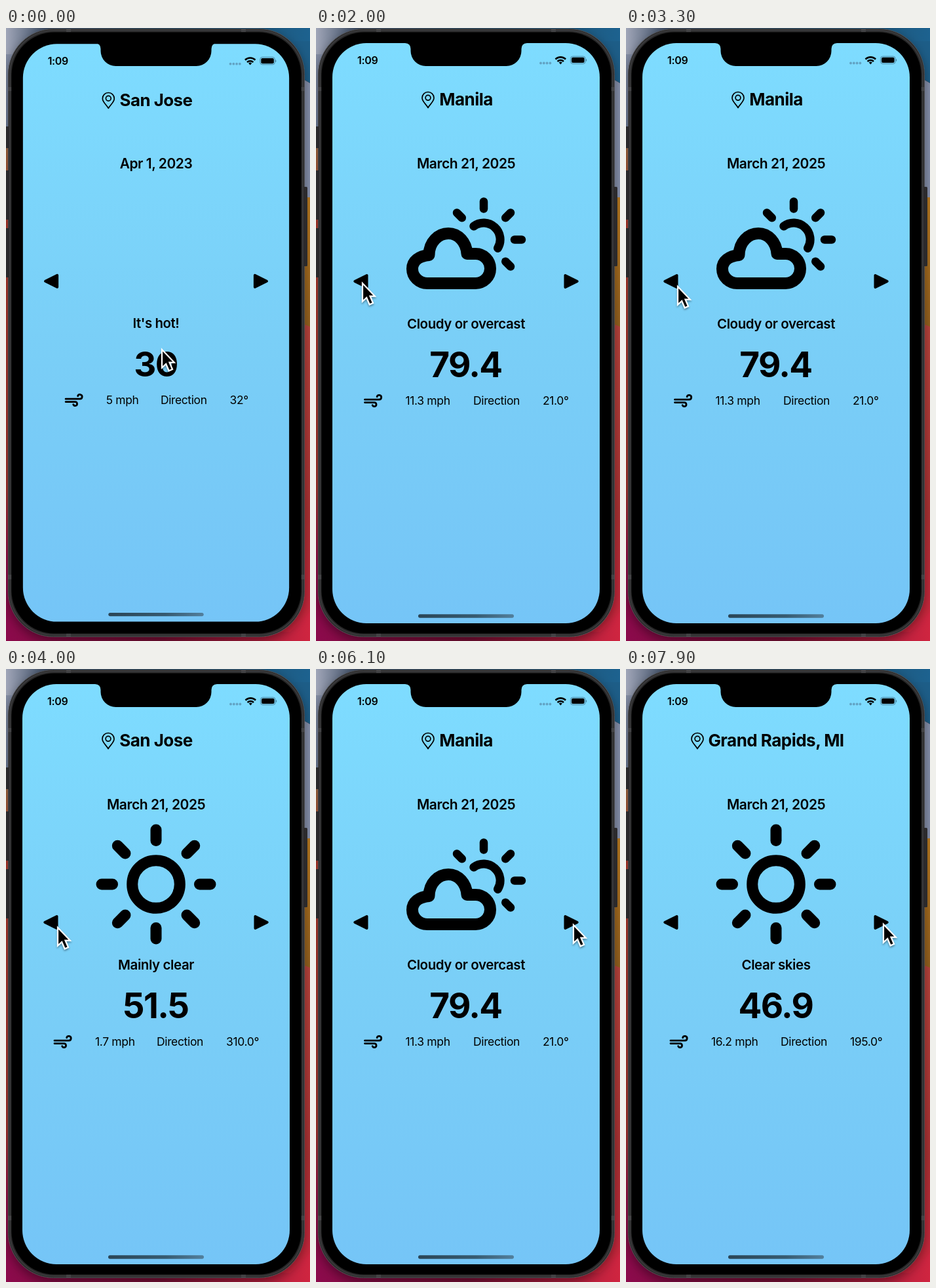
An HTML page that plays this animation: 464 px wide and 934 px high, repeating every 8 s.

```html
<!DOCTYPE html>
<html lang="en">
<head>
<meta charset="utf-8">
<title>Weather app</title>
<style>
html, body { margin: 0; width: 100%; height: 100%; overflow: hidden; background: #000; }
svg { display: block; width: 464px; height: 934px; }
text { font-family: Inter, "Liberation Sans", sans-serif; letter-spacing: -.02em; }
.mid { text-anchor: middle; font-weight: 600; }
.line { fill: none; stroke: #000; stroke-linecap: round; stroke-linejoin: round; }
</style>
</head>
<body>
<svg viewBox="0 0 464 934">
  <defs>
    <linearGradient id="sky" x2="0" y2="1">
      <stop stop-color="#7edcff"/><stop offset=".5" stop-color="#7acff7"/><stop offset="1" stop-color="#75c5f7"/>
    </linearGradient>
    <linearGradient id="leftWall" x2="0" y2="1">
      <stop stop-color="#8b93a8"/><stop offset=".16" stop-color="#71809c"/><stop offset=".2" stop-color="#a5683f"/>
      <stop offset=".3" stop-color="#b23a2c"/><stop offset=".75" stop-color="#a8362f"/><stop offset=".87" stop-color="#980f4a"/>
      <stop offset="1" stop-color="#85094a"/>
    </linearGradient>
    <linearGradient id="topWall">
      <stop stop-color="#a0a6b8"/><stop offset=".14" stop-color="#35465e"/><stop offset=".5" stop-color="#1c4058"/>
      <stop offset="1" stop-color="#1d628f"/>
    </linearGradient>
    <linearGradient id="redWall" x2="0" y2="1">
      <stop stop-color="#b9443d"/><stop offset=".6" stop-color="#ad3234"/><stop offset="1" stop-color="#d1233f"/>
    </linearGradient>
    <linearGradient id="floor">
      <stop stop-color="#8b0a4b"/><stop offset=".5" stop-color="#7a0f35"/><stop offset="1" stop-color="#cf2540"/>
    </linearGradient>
    <linearGradient id="orange" x2="0" y2="1">
      <stop stop-color="#b5771f"/><stop offset="1" stop-color="#94601f"/>
    </linearGradient>
    <linearGradient id="bar"><stop stop-color="#2a4556"/><stop offset=".6" stop-color="#365a70"/><stop offset="1" stop-color="#527f9c"/></linearGradient>
    <filter id="shadow" x="-50%" y="-50%" width="200%" height="200%">
      <feDropShadow dx="0" dy="2" stdDeviation="1.8" flood-opacity=".4"/>
    </filter>
    <filter id="phoneShadow" x="-10%" y="-10%" width="120%" height="120%">
      <feDropShadow dx="0" dy="6" stdDeviation="8" flood-opacity=".4"/>
    </filter>
  </defs>

  <!-- desktop wallpaper -->
  <rect width="232" height="934" fill="url(#leftWall)"/>
  <rect width="464" height="40" fill="url(#topWall)"/>
  <path fill="#1d5d87" d="M400 20H464V84L440 70Z"/>
  <path fill="#858faa" d="M440 70L464 84V260H440Z"/>
  <rect x="440" y="258" width="24" height="200" fill="url(#orange)"/>
  <path fill="url(#redWall)" d="M440 446L464 455V934H400Z"/>
  <path fill="url(#floor)" d="M0 890L30 920H434L464 890V934H0Z"/>

  <!-- phone body -->
  <rect x="3.5" y="1.5" width="452" height="926" rx="69" fill="#262627" stroke="#505052" filter="url(#phoneShadow)"/>
  <g fill="#2b2a2c">
    <rect x="-2" y="150" width="7" height="33" rx="1.5"/>
    <rect x="-2" y="217" width="7" height="75" rx="1.5"/>
    <rect x="-2" y="305" width="7" height="75" rx="1.5"/>
    <rect x="454" y="242" width="6" height="121" rx="1.5"/>
  </g>
  <rect x="6" y="4" width="447" height="921" rx="67" fill="none" stroke="#3a3a3c" stroke-width="2"/>
  <path fill="#434345" d="M4 90h4v6H4zM451 90h4v6h-4zM4 833h4v7H4zM451 833h4v7h-4zM92 2h7v4h-7zM359 2h7v4h-7zM92 923h7v4h-7zM359 923h7v4h-7z"/>
  <rect x="8.5" y="6.5" width="442" height="916" rx="65"/>

  <g id="screen">
    <rect x="25" y="23" width="408" height="884" rx="52" fill="url(#sky)"/>
    <text x="63" y="55" font-size="16" font-weight="600">1:09</text>
    <g fill="#62a3c3">
      <circle cx="343" cy="53.5" r="1.9"/><circle cx="347.8" cy="53.5" r="1.9"/>
      <circle cx="352.6" cy="53.5" r="1.9"/><circle cx="357.4" cy="53.5" r="1.9"/>
    </g>
    <path class="line" stroke-width="2.6" style="stroke-linecap:butt" d="M365.5 47.6a11 11 0 0 1 15.6 0M368.6 51a6.6 6.6 0 0 1 9.4 0"/>
    <path d="M370.8 52.6a3.6 3.6 0 0 1 5 0L373.3 55.4Z"/>
    <rect x="388.5" y="43.2" width="22.6" height="11.4" rx="3.4" fill="none" stroke="#4a87a5"/>
    <rect x="390" y="44.7" width="19.6" height="8.4" rx="2"/>
    <path fill="#4a87a5" d="M412 47a2.2 2.2 0 0 1 0 4Z"/>

    <g id="pin" class="line" stroke-width="1.7">
      <path d="M10 25C7 19.5 1 15.5 1 10a9 9 0 0 1 18 0C19 15.5 13 19.5 10 25Z"/><circle cx="10" cy="9.8" r="3.9"/>
    </g>
    <text id="city" class="mid" x="229" y="118" font-size="26" style="font-weight:650"/>
    <text id="date" class="mid" x="229" y="214" font-size="21"/>

    <g id="sun" class="line" stroke-width="17"><circle cx="229" cy="328" r="36.3"/></g>
    <g id="cloud" class="line">
      <path stroke-width="18" d="M170 389H243.500a22.500 22.500 0 0 0 0-45H230.500C229.500 326 217 313 202 313S172.500 326 172.500 346C157 347.500 147 355 147 367A23 22 0 0 0 170 389Z"/>
      <path stroke-width="13" d="M240.8 302A25.3 25.3 0 0 1 277.5 335.4"/>
      <g id="rays" stroke-width="12.5"/>
    </g>

    <path id="prev" class="line" stroke-width="4" style="fill:#000" d="M59.3 386L77.5 377V395Z"/>
    <use href="#prev" transform="matrix(-1 0 0 1 458 0)"/>

    <text id="sky-text" class="mid" x="229" y="458" font-size="20.5"/>
    <text id="temp" class="mid" x="228.4" y="531.5" font-size="53" style="font-weight:700;letter-spacing:-.03em"/>
    <path id="wind" class="line" stroke-width="2.8" d="M1.5 8.7H23.4a3.4 3.4 0 1 0-3.3-4.5M1.5 13.1H16a3 3 0 1 1-2.8 4"/>
    <g font-size="17.5">
      <text id="speed" y="574"/><text id="label" y="574">Direction</text><text id="angle" y="574"/>
    </g>
    <rect x="156" y="893.3" width="146" height="5.4" rx="2.7" fill="url(#bar)"/>
  </g>

  <path d="M136 20V23Q144.5 23.5 144.5 32V35A23 23 0 0 0 167.5 58H290.5A23 23 0 0 0 313.5 35V32Q313.5 23.5 322 23V20Z"/>
  <path id="cursor" filter="url(#shadow)" stroke="#fff" stroke-width="2.2" d="M0 0V27.5L6.2 21.8L10.7 32.2L16 30L11.5 19.6H18.8Z"/>
</svg>
<script>
const $ = id => document.getElementById(id);
const LOOP = 8000, STEP = 100;

const ray = (cx, cy, r1, r2, deg) => {
  const a = deg * Math.PI / 180, c = Math.cos(a), s = Math.sin(a);
  return `<path d="M${cx + r1 * c} ${cy + r1 * s}L${cx + r2 * c} ${cy + r2 * s}"/>`;
};
for (let d = 0; d < 360; d += 45) $('sun').innerHTML += ray(229, 328, 66.5, 83, d);
for (let d = -135; d <= 45; d += 45) $('rays').innerHTML += ray(256, 322.5, 47, 58, d);

const TODAY = 'March 21, 2025';
const view = (city, pin, date, icon, sky, temp, wind, speed, label, angle) =>
  ({ city, pin, date, icon, sky, temp, wind, speed, label, angle });
const initial = view('San Jose', 146, 'Apr 1, 2023', '', "It's hot!", '30', 89, '5 mph', 237, '32°');
const sanJose = view('San Jose', 146, TODAY, 'sun', 'Mainly clear', '51.5', 72.5, '1.7 mph', 231, '310.0°');
const manila = view('Manila', 161, TODAY, 'cloud', 'Cloudy or overcast', '79.4', 73, '11.3 mph', 241, '21.0°');
const rapids = view('Grand Rapids, MI', 99, TODAY, 'sun', 'Clear skies', '46.9', 66.5, '16.2 mph', 237, '195.0°');
const views = [[0, initial], [1900, manila], [3600, sanJose], [5600, manila], [7000, rapids]];

// cursor stops: time, x, y
const stops = [
  [0, 238, 490], [300, 238, 490], [1000, 102, 397], [1100, 102, 397], [1500, 71, 389], [2100, 71, 389],
  [2600, 119, 410], [2900, 119, 410], [3300, 79, 394], [4100, 79, 394],
  [4800, 360, 383], [5200, 393, 390], [6300, 393, 390], [6700, 393, 389], [8000, 393, 389]
];

const place = (id, x, y) => $(id).setAttribute('transform', `translate(${x} ${y})`);

function show(v) {
  $('city').textContent = v.city;
  $('date').textContent = v.date;
  $('sky-text').textContent = v.sky;
  $('temp').textContent = v.temp;
  $('speed').textContent = v.speed;
  $('angle').textContent = v.angle;
  $('speed').setAttribute('x', v.wind + 63.5);
  $('label').setAttribute('x', v.label - 1);
  $('angle').setAttribute('x', v.label + 105);
  place('pin', v.pin, 96.5);
  place('wind', v.wind, 557.5);
  for (const icon of ['sun', 'cloud']) $(icon).style.display = v.icon === icon ? '' : 'none';
}

function moveCursor(t) {
  const i = stops.findIndex(s => s[0] > t);
  const [t0, x0, y0] = stops[i - 1], [t1, x1, y1] = stops[i];
  const p = (t - t0) / (t1 - t0), e = p * p * (3 - 2 * p);
  place('cursor', x0 + (x1 - x0) * e, y0 + (y1 - y0) * e);
}

let current;
function draw(now) {
  const t = Math.floor((now % LOOP) / STEP) * STEP;
  const next = views.filter(v => v[0] <= t).pop()[1];
  if (next !== current) show(current = next);
  const settle = 1 - .0042 * Math.max(0, 1 - t / 300) ** 2;
  $('screen').setAttribute('transform', `translate(229 330) scale(${settle}) translate(-229 -330)`);
  moveCursor(t);
}

const start = performance.now();
function tick() {
  draw(performance.now() - start);
  requestAnimationFrame(tick);
}
tick();
</script>
</body>
</html>
```
